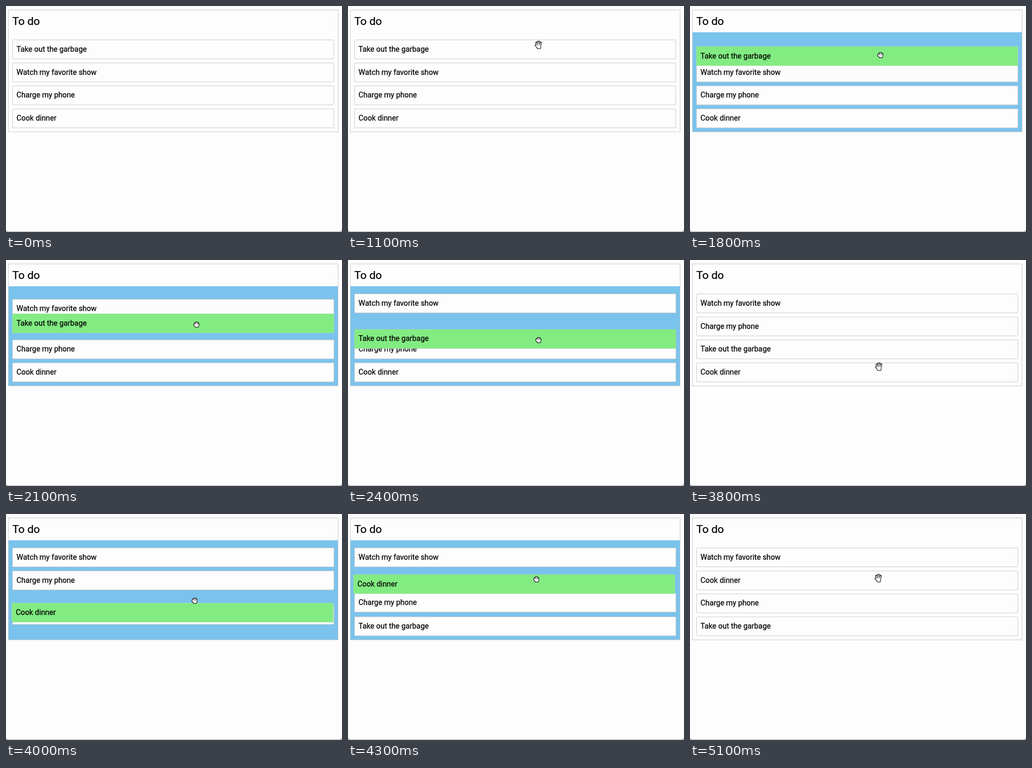
Write an HTML page that moves like this. It is 640 px wide and 430 px high and loops after 6200 ms.

```html
<!DOCTYPE html>
<html lang="en">
<head>
<meta charset="utf-8">
<title>To do</title>
<style>
  html, body { margin: 0; width: 100%; height: 100%; overflow: hidden; background: #fdfdfd; }
  svg { display: block; }
  text { font: 14.3px Roboto, sans-serif; stroke: #000; stroke-width: .25px; }
  .title { font-size: 21px; }
  .box { fill: #fdfdfd; stroke: #ccc; }
  .dragged .box { fill: #82eb82; stroke: #9be0a0; }
  .hand { fill: #fff; stroke-linejoin: round; stroke-linecap: round; }
</style>
</head>
<body>
<svg width="640" height="430">
  <rect width="640" height="430" fill="#aaa"/>
  <path d="M0 0H640V423Q640 429 634 429H5Q0 429 0 424Z" fill="#fdfdfd"/>
  <rect class="box" x="4.5" y="7.5" width="628" height="232"/>
  <text class="title" x="12" y="36">To do</text>
  <rect id="list" x="5" y="50" width="627" height="189" fill="#7ac3ec"/>
  <g id="items"></g>
  <g id="pointer">
    <path id="arrow" d="M0 0V11.5L2.7 9 4.6 13.2 6.6 12.3 4.8 8.3H8.2Z" stroke="#fff" stroke-width=".8"/>
    <g id="open" class="hand"></g>
    <g id="closed" class="hand"></g>
  </g>
</svg>
<script>
const LOOP = 6200, STEP = 100, SETTLE = 250, LAG = 80;
const LEFT = 12.5, TOP = 64.5, PITCH = 43.75, HEIGHT = 36;
const $ = id => document.getElementById(id);
const slotY = slot => TOP + slot * PITCH;

// Slot moves are [start time, new slot]; a drag holds its grab point
const items = [
  { label: 'Watch my favorite show', slot: 1, moves: [[2000, 0]] },
  { label: 'Charge my phone', slot: 2, moves: [[2420, 1], [4125, 2]] },
  { label: 'Take out the garbage', slot: 0, moves: [[3945, 3]],
    drag: { start: 1600, release: 2730, x: 363, y: 76.5, to: 2 } },
  { label: 'Cook dinner', slot: 3, moves: [],
    drag: { start: 3900, release: 4750, x: 361, y: 206, to: 1 } }
];

// Pointer stops: time, x, y
const stops = [
  [300, 575, 323], [900, 363, 64], [1200, 363, 79], [1500, 363, 79],
  [1800, 363, 93], [2400, 363, 152], [2700, 364, 171], [3000, 364, 168],
  [3600, 360, 203], [3800, 360, 203], [4200, 359, 126], [4400, 359, 122]
];

const clamp = u => Math.min(Math.max(u, 0), 1);
const ease = u => 1 - (1 - clamp(u)) ** 2.8;
const mix = (a, b, u) => a + (b - a) * u;

function pointerAt(t) {
  const next = stops.findIndex(stop => stop[0] > t);
  const i = next < 0 ? stops.length - 1 : Math.max(next, 1);
  const [t0, x0, y0] = stops[i - 1], [t1, x1, y1] = stops[i];
  const u = clamp((t - t0) / (t1 - t0));
  return [mix(x0, x1, u), mix(y0, y1, u)];
}

function place({ slot, moves, drag }, t) {
  let x = LEFT, y = slotY(slot);
  if (drag && t >= drag.start) {
    const [px, py] = pointerAt(Math.min(t, drag.release) - LAG);
    const settle = ease((t - drag.release) / SETTLE);
    x = mix(x + px - drag.x, x, settle);
    y = mix(y + py - drag.y, slotY(drag.to), settle);
  }
  for (const [start, next] of moves) y = mix(y, slotY(next), ease((t - start) / SETTLE));
  return [x, y];
}

// Four fingers, a thumb and a palm, outlined by a wider dark stroke
function hand(reach, splay, base) {
  let d = `M-2 1.5H3L2.6 ${base}H-1.6ZM-2 ${base - 1.5}L${-1.8 * splay} 1`;
  for (let i = -1.5; i < 2; i++) d += `M${i * 1.8} 2L${i * splay} ${i * i - reach}`;
  return `<path d="${d}" stroke="#000" stroke-width="3.6"/><path d="${d}" stroke="#fff" stroke-width="1.6"/>`;
}
$('open').innerHTML = hand(6.3, 3, 6);
$('closed').innerHTML = hand(3.8, 2.4, 4.2);

for (const item of items) {
  $('items').insertAdjacentHTML('beforeend',
    `<g><rect class="box" width="612" height="${HEIGHT}" rx="1"/><text x="7.5" y="22.3">${item.label}</text></g>`);
  item.node = $('items').lastChild;
}

const show = (id, on) => $(id).setAttribute('visibility', on ? 'visible' : 'hidden');
const move = (node, x, y) => node.setAttribute('transform', `translate(${x} ${y})`);

function draw(now) {
  const t = Math.floor(now % LOOP / STEP) * STEP;
  const active = items.find(({ drag }) => drag && t >= drag.start && t < drag.release + SETTLE);
  for (const item of items) {
    move(item.node, ...place(item, t));
    item.node.classList.toggle('dragged', item === active);
  }
  show('list', active);

  const [x, y] = pointerAt(t);
  const overItem = y < slotY(4) && (y - TOP + PITCH) % PITCH < HEIGHT;
  const dragging = active && t < active.drag.release;
  const cursor = dragging ? 'closed' : overItem && !active ? 'open' : 'arrow';
  for (const id of ['arrow', 'open', 'closed']) show(id, t >= stops[0][0] && id === cursor);
  move($('pointer'), x, y);
  requestAnimationFrame(draw);
}
requestAnimationFrame(draw);
</script>
</body>
</html>
```
